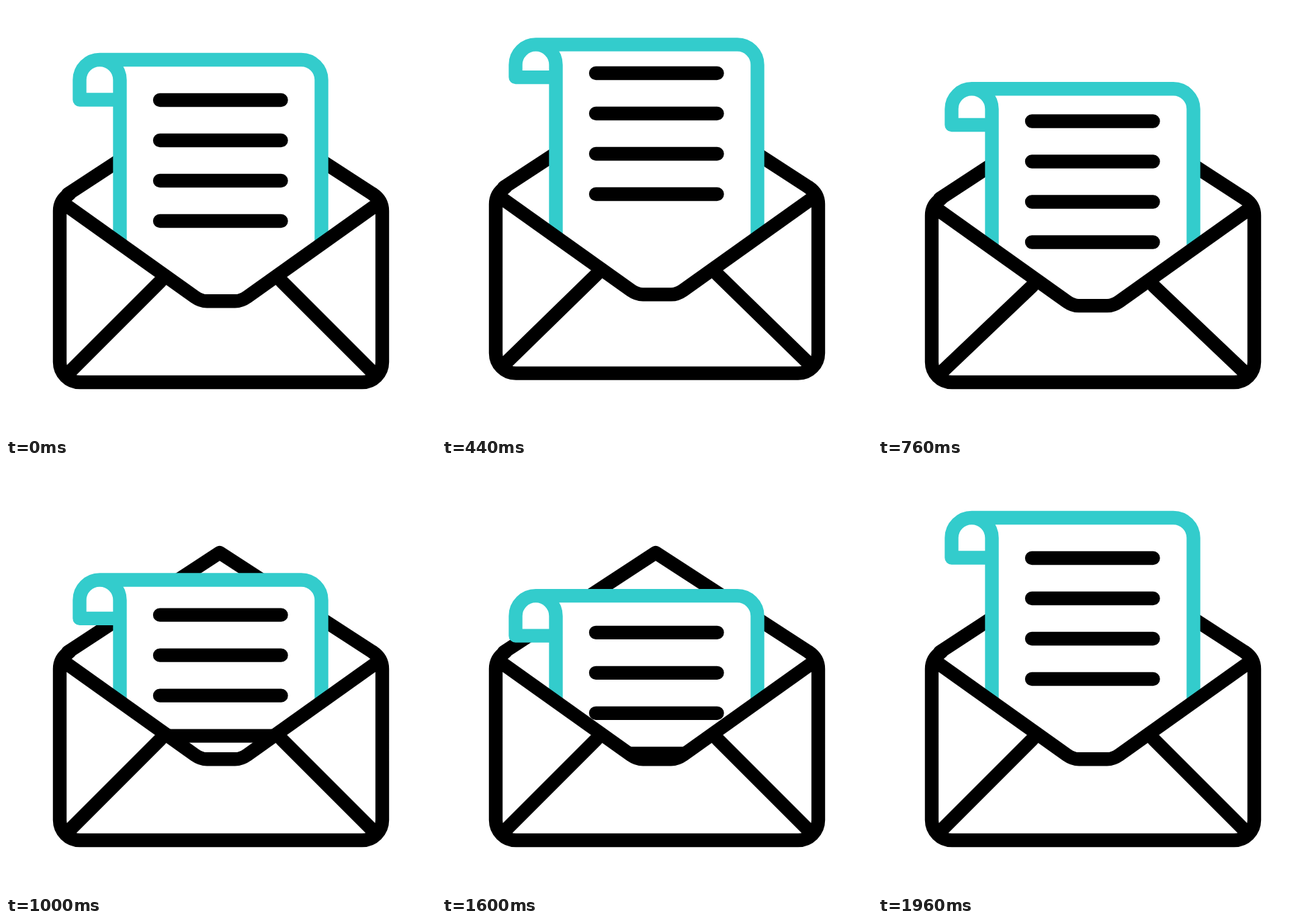
An HTML page with a canvas for the animation above (2 s loop, 640 by 640 pixels).

```html
<!DOCTYPE html>
<html lang="en">
<head>
<meta charset="utf-8">
<title>Letter in an envelope</title>
<style>
  html, body { margin: 0; width: 100%; height: 100%; overflow: hidden; background: #fff; }
  canvas { display: block; width: 640px; height: 640px; }
</style>
</head>
<body>
<canvas id="stage" width="640" height="640"></canvas>
<script>
const ctx = document.getElementById('stage').getContext('2d');
const LOOP = 2000, STEP = 40;
const INK = '#000', TEAL = '#33cccc', PAPER = '#fff';

// Vertical offsets as [time, value] keys
const track = {
  top:   [[120, 0], [230, -39], [1320, 120], [1560, 120], [1940, 0]],
  curl:  [[120, 0], [230, -51], [1320, 120], [1560, 120], [1940, 0]],
  lines: [[120, 0], [230, -57.7], [1320, 114.5], [1560, 114.5], [1940, 0]],
  flap:  [[120, 0], [230, -25], [700, 8], [960, 0]],
  base:  [[120, 0], [230, -24.5], [700, 0]]
};

// Cubic ease with handles (1/3, 0) and (0.6, 1)
function ease(x) {
  let lo = 0, hi = 1;
  for (let i = 0; i < 24; i++) {
    const s = (lo + hi) / 2;
    if (s - 0.2 * (1 - s) * s * s < x) lo = s; else hi = s;
  }
  return lo * lo * (3 - 2 * lo);
}

function valueAt(keys, t) {
  if (t <= keys[0][0]) return keys[0][1];
  for (let i = 1; i < keys.length; i++) {
    const [t0, a] = keys[i - 1], [t1, b] = keys[i];
    if (t < t1) return a + (b - a) * ease((t - t0) / (t1 - t0));
  }
  return keys[keys.length - 1][1];
}

function stroke(color, build) {
  ctx.strokeStyle = color;
  ctx.beginPath();
  build();
  ctx.stroke();
}

function line(x0, y0, x1, y1) {
  ctx.moveTo(x0, y0);
  ctx.lineTo(x1, y1);
}

function drawRoof(y) {
  stroke(INK, () => {
    ctx.moveTo(92, 280 + y);
    ctx.lineTo(318, 132 + y);
    ctx.lineTo(546, 280 + y);
  });
}

function drawPaper(top, curl, rows) {
  const y = 80 + top, foot = 139.5 + curl;

  ctx.fillStyle = PAPER;
  ctx.beginPath();
  ctx.moveTo(109.5, foot);
  ctx.lineTo(109.5, y + 30);
  ctx.arc(139.5, y + 30, 30, Math.PI, Math.PI * 1.5);
  ctx.arcTo(469.5, y, 469.5, y + 30, 30);
  ctx.lineTo(469.5, 450);
  ctx.lineTo(169.5, 450);
  ctx.lineTo(169.5, foot);
  ctx.fill();

  stroke(TEAL, () => {
    ctx.moveTo(169.5, foot);
    ctx.lineTo(109.5, foot);
    ctx.lineTo(109.5, y + 30);
    ctx.arc(139.5, y + 30, 30, Math.PI, 0);
    ctx.lineTo(169.5, 450);
    ctx.moveTo(139.5, y);
    ctx.arcTo(469.5, y, 469.5, y + 30, 30);
    ctx.lineTo(469.5, 450);
  });

  stroke(INK, () => {
    for (let i = 0; i < 4; i++) {
      const row = 140 + 60 * i + rows;
      line(229, row, 409.5, row);
    }
  });
}

function pocketEdge(y) {
  ctx.moveTo(88, 295.5 + y);
  ctx.lineTo(281, 433 + y);
  ctx.quadraticCurveTo(290, 439.3 + y, 299, 439.3 + y);
  ctx.lineTo(341, 439.3 + y);
  ctx.quadraticCurveTo(350, 439.3 + y, 359, 433 + y);
  ctx.lineTo(552, 295.5 + y);
}

function drawFront(flap, base) {
  const bottom = 560 + base;

  ctx.fillStyle = PAPER;
  ctx.beginPath();
  pocketEdge(flap);
  ctx.lineTo(555, bottom - 12);
  ctx.lineTo(530, bottom);
  ctx.lineTo(110, bottom);
  ctx.lineTo(85, bottom - 12);
  ctx.fill();

  stroke(INK, () => {
    pocketEdge(flap);
    line(230, 409.5 + flap, 91, bottom - 11.5);
    line(410, 409.5 + flap, 549, bottom - 11.5);
    ctx.moveTo(94, 280 + flap);
    ctx.bezierCurveTo(85, 286 + flap, 80, 295 + flap, 80, 305 + flap);
    ctx.arcTo(80, bottom, 110, bottom, 30);
    ctx.arcTo(560, bottom, 560, bottom - 30, 30);
    ctx.lineTo(560, 305 + flap);
    ctx.bezierCurveTo(560, 295 + flap, 555, 286 + flap, 546, 280 + flap);
  });
}

function draw(t) {
  const at = name => valueAt(track[name], t);
  const flap = at('flap');
  ctx.fillStyle = '#fff';
  ctx.fillRect(0, 0, 640, 640);
  ctx.lineWidth = 20.4;
  ctx.lineCap = ctx.lineJoin = 'round';
  drawRoof(flap);
  drawPaper(at('top'), at('curl'), at('lines'));
  drawFront(flap, at('base'));
}

const start = performance.now();
function tick() {
  const t = Math.max(0, performance.now() - start) % LOOP;
  draw(Math.floor(t / STEP) * STEP);
  requestAnimationFrame(tick);
}
tick();
</script>
</body>
</html>
```
